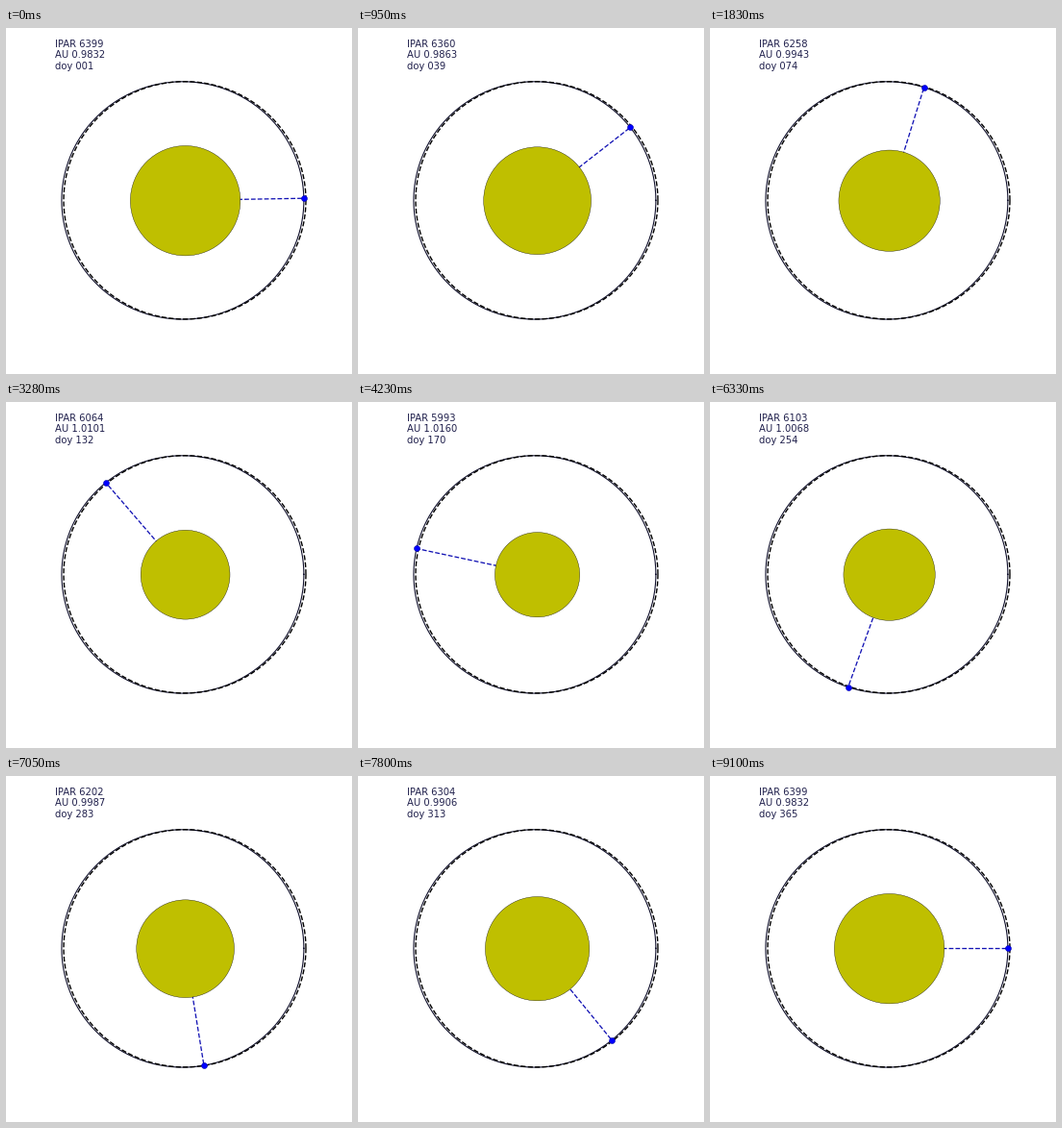
These frames come from a looping animation (360 by 360 pixels, 9.12 s). A matplotlib script:

```python
import numpy as np
import matplotlib.pyplot as plt
from matplotlib.animation import FuncAnimation
from matplotlib.patches import Circle

SIZE, DPI = 360, 72
DAYS, LOOP_MS = 365, 9120
SUN_X, SUN_Y = 186.0, 180.7    # pixels from the lower left
AU_X, AU_Y = 126.0, 123.6      # pixels per AU
PAR_1AU = 6186.2

plt.rcParams["font.family"] = "DejaVu Sans"


def distance(doy):
    """Earth-Sun distance in AU for a day of year."""
    m = np.radians(0.9856 * (doy - 3.75))
    return 1.00008 - 0.01674 * np.cos(m) - 0.00016 * np.cos(2 * m)


def position(doy, r):
    angle = 2 * np.pi * doy / DAYS
    return SUN_X + AU_X * r * np.cos(angle), SUN_Y + AU_Y * r * np.sin(angle)


fig = plt.figure(figsize=(SIZE / DPI, SIZE / DPI), dpi=DPI, facecolor="white")
ax = fig.add_axes([0, 0, 1, 1])
ax.set(xlim=(0, SIZE), ylim=(0, SIZE))
ax.axis("off")

days = np.arange(DAYS + 1)
ax.plot(*position(days, distance(days)), "-", color="#10102c", lw=1.1)
ax.plot(*position(days, 1.0), "k--", lw=1.4)

ray, = ax.plot([], [], color="#1212b4", lw=1.3, dashes=(3.7, 1.6))
sun = Circle((SUN_X + 0.6, SUN_Y - 0.4), 1, fc="y", ec="k", lw=0.35, zorder=3)
ax.add_patch(sun)
earth, = ax.plot([], [], "o", color="b", ms=6, mec="#0000a0", mew=0.5, zorder=4)
label = ax.text(51, SIZE - 11.5, "", size=10, color="#20204c",
                va="top", ha="left", linespacing=1.24)


def update(i):
    doy = i + 1
    r = distance(doy)
    par = PAR_1AU / r**2
    x, y = position(doy, r)
    ray.set_data([SUN_X, x], [SUN_Y, y])
    earth.set_data([x], [y])
    sun.set_radius(57.2 + 0.0322 * (par - 6399))
    label.set_text(f"IPAR {par:.0f}\nAU {r:.4f}\ndoy {doy:03d}")
    return ray, sun, earth, label


anim = FuncAnimation(fig, update, frames=DAYS, interval=LOOP_MS / DAYS,
                     repeat=True, repeat_delay=0)
plt.show()
```
